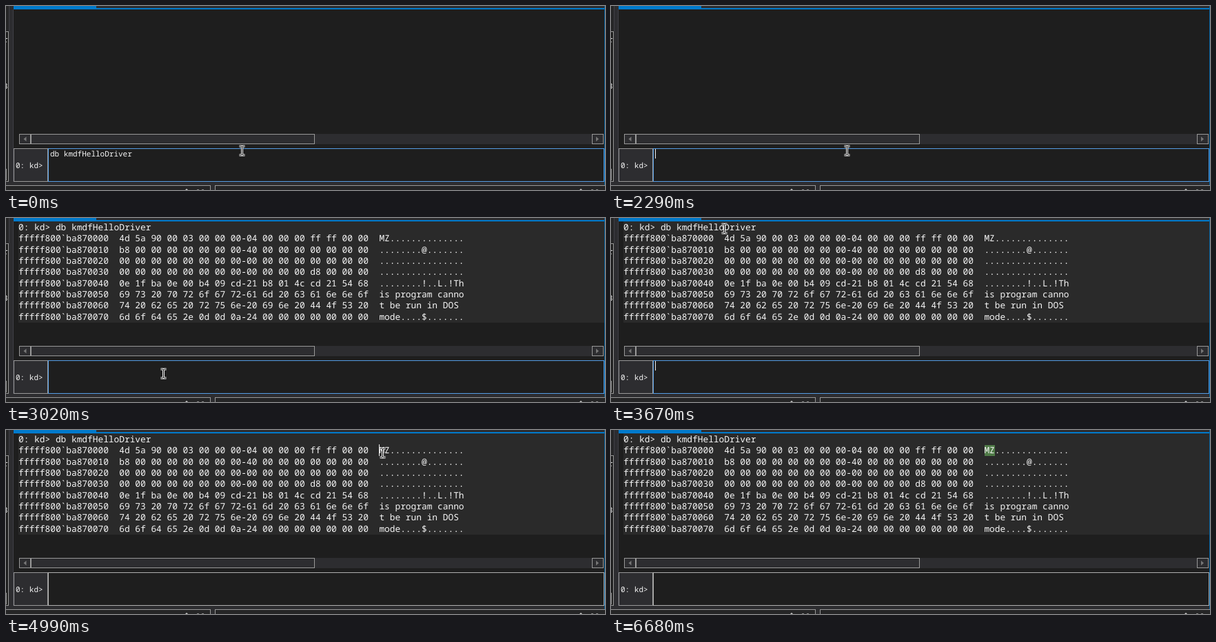
These frames come from a looping animation (869 by 269 pixels, 6.78 s). An HTML page:

```html
<!DOCTYPE html>
<html lang="en">
<head>
<meta charset="utf-8">
<title>Debugger console</title>
<style>
  html, body { margin: 0; width: 100%; height: 100%; overflow: hidden; background: #2d2d30; }
  svg { display: block; width: 100vw; height: 100vh; }
  text {
    font-family: "Noto Sans Mono", "DejaVu Sans Mono", monospace;
    font-weight: 500;
    white-space: pre;
    text-rendering: geometricPrecision;
    fill: #f6f6f6;
  }
  .small { font-size: 11px; }
  .large { font-size: 12.833px; }
  .frame { stroke: #999; shape-rendering: crispEdges; }
  .flat { shape-rendering: crispEdges; }
</style>
</head>
<body>
<svg id="stage" viewBox="0 0 869 269" preserveAspectRatio="none"></svg>
<script>
const LOOP = 6780, BLINK = 535, STEP = 70, KEY = 170;
const CHAR = 7.7, SMALL = 6.6, LINE = 16.4, LEFT = 18, TOP = 5.2;
const COMMAND = "db kmdfHelloDriver", PROMPT = "0: kd> ";
const TEAL = "#3f8a82", GREEN = "#4f7a47";
const AT = {
  firstBlink: 320, clear: 470, type: 1080, paste: 1890, enter: 2290, print: 2380,
  click: 3740, pickWord: 3910, clickMagic: 4990, pickMagic: 5070, leave: 6010, recolor: 6620
};
const stage = document.getElementById("stage");

function add(tag, attrs, parent = stage) {
  const el = document.createElementNS("http://www.w3.org/2000/svg", tag);
  for (const key in attrs) el.setAttribute(key, attrs[key]);
  parent.appendChild(el);
  return el;
}
const fill = (x, y, width, height, color, parent) =>
  add("rect", { x, y, width, height, fill: color, class: "flat" }, parent);
const box = (x, y, width, height, color) =>
  add("rect", { x: x + .5, y: y + .5, width: width - 1, height: height - 1, fill: color, class: "frame" });
const shape = (d, color) => add("path", { d, fill: color });
function label(x, y, string, size, parent) {
  const el = add("text", { x, y, class: size }, parent);
  el.textContent = string;
  return el;
}
const show = (el, on) => el.setAttribute("visibility", on ? "visible" : "hidden");

// Window chrome
fill(0, 0, 869, 269, "#2d2d30");
fill(0, 0, 4, 37, "#252526");
fill(4, 0, 1, 37, "#3f3f46");
box(-2, 37, 6, 220, "#1e1e1e");
label(-4, 53, "r", "small");
label(-4, 121, "3", "small");
box(-4, 238, 5, 17, "#3e3e42");
fill(10, 5, 1, 252, "#3f3f46");
fill(11, 5, 857, 203, "#1e1e1e");
fill(11, 0, 120, 4, "#007acc");
fill(11, 3, 858, 2, "#007acc");
fill(868, 0, 1, 262, "#0a65a3");
box(-2, 262, 299, 10, "#252526");
box(303, 262, 570, 10, "#252526");
for (const x of [262, 834]) {
  shape(`M${x - 2} 269l2-2 2 2z`, "#ccc");
  for (const dx of [15, 22]) fill(x + dx, 268, 3, 1, "#888");
}

// Horizontal scroll bar
fill(19, 187, 848, 15, "#2d2d30");
for (const [x, width] of [[19, 17], [36, 412], [850, 17]]) box(x, 187, width, 15, "#2d2d30");
shape("M29.5 191v7l-4-3.5z", "#777");
shape("M856 191v7l4-3.5z", "#777");

// Memory dump: a program header followed by its start-up message
const memory = new Uint8Array(128);
const put = (offset, string) => [...string].forEach((c, i) => memory[offset + i] = c.charCodeAt(0));
put(0, "MZ\x90\0\x03");
put(8, "\x04");
put(12, "\xff\xff");
put(16, "\xb8");
put(24, "@");
put(60, "\xd8");
put(64, "\x0e\x1f\xba\x0e\0\xb4\x09\xcd!\xb8\x01L\xcd!This program cannot be run in DOS mode.\r\r\n$");

const hex = bytes => Array.from(bytes, b => b.toString(16).padStart(2, "0")).join(" ");
const ascii = bytes => Array.from(bytes, b => b > 31 && b < 127 ? String.fromCharCode(b) : ".").join("");
function dumpLine(row) {
  const bytes = memory.slice(row * 16, row * 16 + 16);
  return `fffff800\`ba8700${row}0  ${hex(bytes.slice(0, 8))}-${hex(bytes.slice(8))}  ${ascii(bytes)}`;
}

const output = add("g", {});
fill(LEFT, 5, 850, 148, "#2a2a2a", output);
const wordMark = fill(LEFT + 10 * CHAR, TOP, 15 * CHAR, LINE, TEAL, output);
const magicMark = fill(LEFT + 68 * CHAR, TOP + LINE, 2 * CHAR, LINE, TEAL, output);
for (let i = 0; i < 9; i++)
  label(LEFT, Math.floor(TOP + 13 + LINE * i), i ? dumpLine(i - 1) : PROMPT + COMMAND, "large", output);
const outCaret = fill(0, 0, 1, 17, "#f1f1f1", output);

// Prompt and input
box(11, 208, 50, 49, "#2d2d30");
label(14, 237, PROMPT, "small");
const input = box(61, 208, 807, 49, "#1e1e1e");
const typed = label(64, 220, "", "small");
const caret = fill(64, 209, 1, 14, "#f1f1f1");

// Text pointer
const pointer = add("g", {});
const beam = "M-4-6.5h3l1 1 1-1h3M0-5.5V5.5M-4 6.5h3l1-1 1 1h3";
for (const [color, width] of [["#fff", 3], ["#000", 1]])
  add("path", { d: beam, fill: "none", stroke: color, "stroke-width": width }, pointer);

const lit = age => Math.floor(age / BLINK) % 2 === 0;

// Each move is a curve from one resting place to the next
const rest = [[342, 211], [164, 15], [546, 33], [832, 273]];
const moves = [
  { start: 2740, end: 3500, bend: [148, 302] },
  { start: 4170, end: 4900, bend: [340, 98] },
  { start: 5190, end: 5910, bend: [760, 200] }
];
function pointerAt(time) {
  const i = moves.filter(move => move.start <= time).length - 1;
  if (i < 0) return rest[0];
  const { start, end, bend } = moves[i];
  if (time >= end) return rest[i + 1];
  const u = Math.floor((time - start) / STEP) * STEP / (end - start), v = 1 - u;
  return bend.map((b, axis) =>
    Math.round(v * v * rest[i][axis] + 2 * u * v * b + u * u * rest[i + 1][axis]));
}

// Number of visible characters and the time of the last edit
function inputAt(time) {
  if (time < AT.clear) return [COMMAND.length, AT.firstBlink];
  if (time < AT.type) return [0, AT.clear];
  if (time < AT.paste) {
    const keys = Math.min(2, Math.floor((time - AT.type) / KEY));
    return [keys + 1, AT.type + keys * KEY];
  }
  return time < AT.enter ? [COMMAND.length, AT.paste] : [0, AT.enter];
}

// Column, row and click time of the caret in the output
function outCaretAt(time) {
  if (time < AT.pickWord) return [19, 0, AT.click];
  if (time < AT.clickMagic) return [25, 0, AT.pickWord];
  return time < AT.pickMagic ? [68, 1, AT.clickMagic] : [70, 1, AT.pickMagic];
}

function draw(time) {
  const [x, y] = pointerAt(time);
  pointer.setAttribute("transform", `translate(${x + .5} ${y + .5})`);
  show(pointer, time < AT.leave);

  const focused = time < AT.click;
  const [count, edited] = inputAt(time);
  typed.textContent = COMMAND.slice(0, count);
  caret.setAttribute("x", Math.floor(64 + count * SMALL));
  show(caret, focused && lit(time - edited));
  const hovered = x > 61 && y > 207 && y < 258;
  input.style.stroke = focused ? "#569de5" : hovered ? "#7eb4ea" : "#b0b0b0";

  show(output, time >= AT.print);
  show(wordMark, time >= AT.pickWord && time < AT.clickMagic);
  show(magicMark, time >= AT.pickMagic);
  magicMark.setAttribute("fill", time < AT.recolor ? TEAL : GREEN);

  const [column, row, clicked] = outCaretAt(time);
  outCaret.setAttribute("x", Math.floor(LEFT + column * CHAR));
  outCaret.setAttribute("y", Math.floor(TOP + row * LINE));
  show(outCaret, !focused && lit(time - clicked));
}

const begin = performance.now();
function tick() {
  draw((performance.now() - begin) % LOOP);
  requestAnimationFrame(tick);
}
tick();
</script>
</body>
</html>
```
